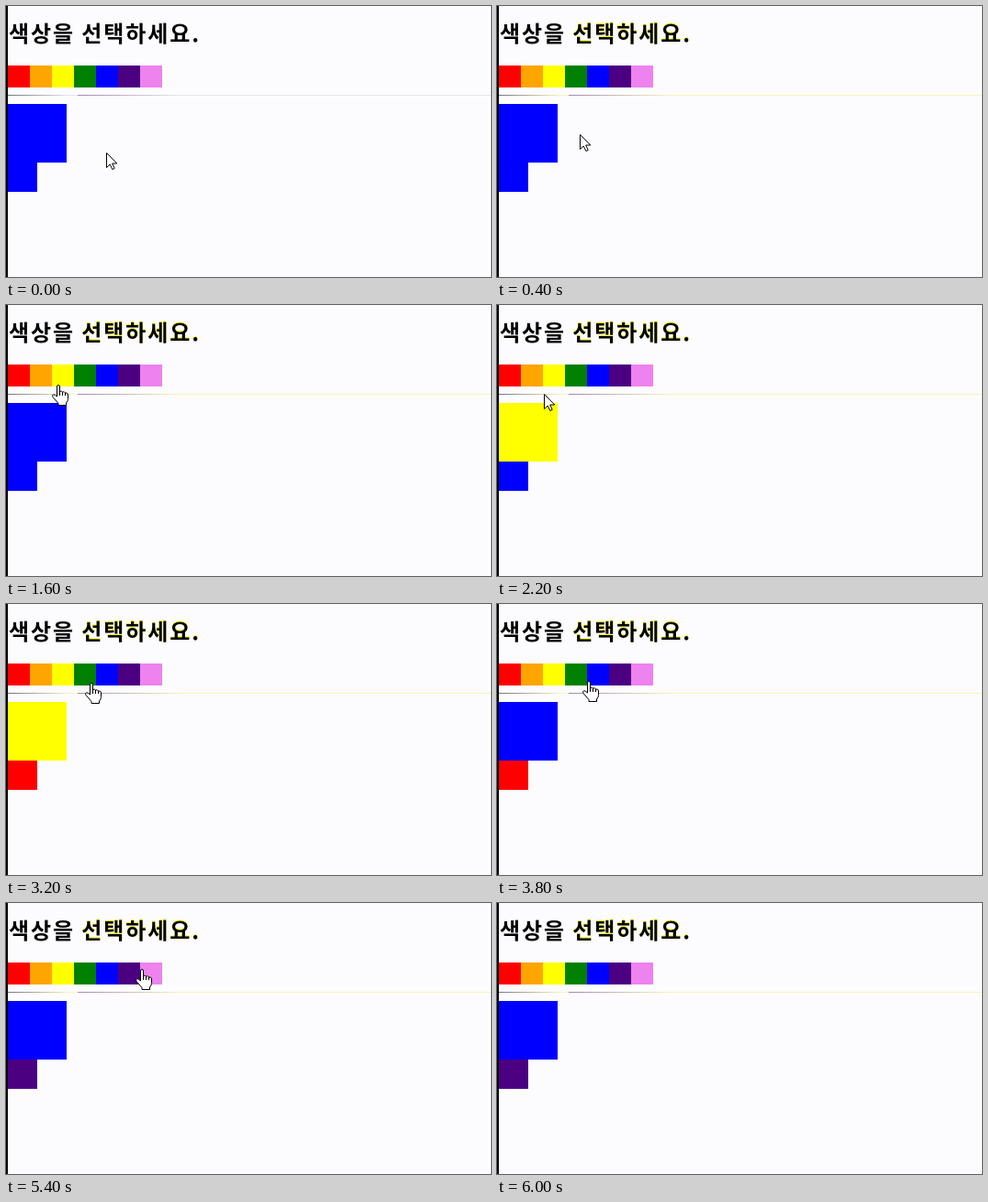
Animation, 528 px wide and 296 px high, one loop 6200 ms. Source, as an HTML page with a canvas:

```html
<!DOCTYPE html>
<html lang="ko">
<head>
<meta charset="utf-8">
<style>
html, body { margin: 0; height: 100%; overflow: hidden; background: #fcfcfe; }
canvas { display: block; }
</style>
</head>
<body>
<canvas id="stage" width="528" height="296"></canvas>
<script>
const ctx = document.getElementById('stage').getContext('2d');
const LOOP = 6200, STEP = 200, LEFT = 2, TOP = 65, CELL = 24;
const palette = ['#f00', '#ffa500', '#ff0', '#008000', '#00f', '#4b0082', '#ee82ee'];

// Pointer stops; a stop with a box clicks the swatch under the pointer
const stops = [
  { t: 0, x: 109, y: 160 },
  { t: 1000, x: 55, y: 102 },
  { t: 1800, x: 57, y: 84, box: 'big' },
  { t: 2200, x: 51, y: 97 },
  { t: 2800, x: 16, y: 83, box: 'small' },
  { t: 3200, x: 93, y: 86 },
  { t: 3600, x: 100, y: 84, box: 'big' },
  { t: 3800, x: 100, y: 84 },
  { t: 4800, x: 144, y: 82, box: 'small' },
  { t: 5200, x: 144, y: 82 },
  { t: 6000, x: 170, y: 20 }
];

const arrow = new Path2D('M.5 .5V16.5L4.2 13 6.8 18.5 9.2 17.4 6.7 12H11.8Z');
const hand = new Path2D(
  'M-1.5 13V2Q-1.5 .5 0 .5T1.5 2V7.5Q3.5 6.5 4.5 8 6.5 7 7.5 9 10.5 8.5 10.5 11' +
  'V15.5Q10.5 18 8.5 20V22.5H0V20.5L-6 13.5Q-7 11.5-5.5 10.8-4 10.5-1.5 13Z' +
  'M1.5 7V12M4.5 8V12M7.5 9V12');

const ease = k => k * k * (3 - 2 * k);

function pointAt(t) {
  const i = stops.findIndex(s => s.t > t);
  const a = stops[i - 1], b = stops[i];
  const k = ease((t - a.t) / (b.t - a.t));
  return [Math.round(a.x + (b.x - a.x) * k), Math.round(a.y + (b.y - a.y) * k)];
}

function fillOf(box, t) {
  const click = stops.filter(s => s.box === box && s.t <= t).pop();
  return click ? palette[Math.floor((click.x - LEFT) / CELL)] : '#00f';
}

function rect(color, x, y, w, h) {
  ctx.fillStyle = color;
  ctx.fillRect(x, y, w, h);
}

function fadeLine(x, w, color, end) {
  const g = ctx.createLinearGradient(x, 0, x + w, 0);
  g.addColorStop(0, color);
  g.addColorStop(1, end);
  rect(g, x, 97, w, 1);
}

function title(fringed) {
  const head = '색상을 ', tail = '선택하세요.', x = 3, y = 39;
  ctx.font = 'bold 24px "Noto Sans CJK KR", "Noto Sans CJK", sans-serif';
  ctx.letterSpacing = '1.9px';
  const tailX = x + ctx.measureText(head).width;
  if (fringed) {
    ctx.fillStyle = '#ff0';
    ctx.fillText(tail, tailX, y - 1);
  }
  ctx.fillStyle = '#000';
  ctx.fillText(head, x, y);
  ctx.fillText(tail, tailX, y);
}

function pointer(t) {
  const [x, y] = pointAt(t);
  const over = x >= LEFT && x < LEFT + palette.length * CELL && y >= TOP && y < TOP + CELL;
  const shape = over ? hand : arrow;
  ctx.save();
  ctx.translate(x, y);
  ctx.fillStyle = '#fff';
  ctx.strokeStyle = '#000';
  ctx.fill(shape);
  ctx.stroke(shape);
  ctx.restore();
}

function draw(now) {
  const t = Math.floor(now % LOOP / STEP) * STEP;
  const tinted = t > 0, rule = tinted ? '#f8f4bc' : '#e6e6ea';
  rect('#fcfcfe', 0, 0, 528, 296);
  title(tinted);
  palette.forEach((color, i) => rect(color, LEFT + i * CELL, TOP, CELL, CELL));
  rect(rule, LEFT, 97, 526, 1);
  fadeLine(LEFT, 66, '#777080', rule);
  fadeLine(78, 110, '#a088b0', rule);
  rect(fillOf('big', t), LEFT, 107, 64, 64);
  rect(fillOf('small', t), LEFT, 171, 32, 32);
  rect('#000', 0, 0, LEFT, 296);
  if (t < stops[stops.length - 1].t) pointer(t);
}

const start = performance.now();
function tick() {
  draw(performance.now() - start);
  requestAnimationFrame(tick);
}
tick();
</script>
</body>
</html>
```
